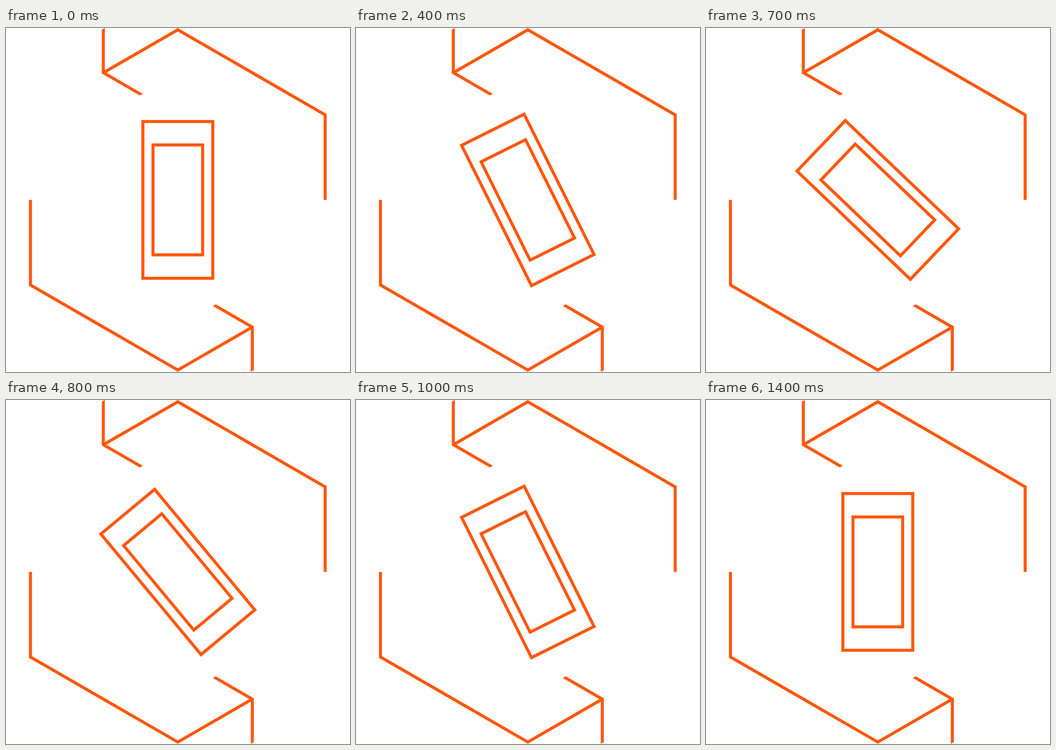
Animation of 748 by 748 pixels, one loop 1.5 s. Source, as an HTML page:

```html
<!DOCTYPE html>
<html lang="en">
<head>
<meta charset="utf-8">
<title>Rotate device</title>
<style>
  html, body { margin: 0; height: 100%; overflow: hidden; background: #fff; }
  svg { display: block; width: 100vw; height: 100vh; }
</style>
</head>
<body>
<svg viewBox="0 0 748 748" fill="none" stroke="#ff570d" stroke-width="6.6" stroke-miterlimit="10">
  <g id="arrow">
    <path d="M211.6 97.3 373.6 3.8 694 188.8V373.8"/>
    <path d="M208.3 3.7 214.9 0V95.3L297.5 143 291 146.8 208.3 99.1Z" fill="#ff570d" stroke="none"/>
  </g>
  <use href="#arrow" transform="rotate(180 373.6 373.8)"/>
  <g id="phone">
    <rect x="297.6" y="203.4" width="152" height="340.8"/>
    <rect x="319.6" y="254.3" width="108" height="239"/>
  </g>
</svg>
<script>
  const STEP_MS = 100, STEPS = 15, TURN = 6.62;
  const phone = document.getElementById('phone');

  // Tilts left for seven steps, then back upright.
  function draw(now) {
    const step = Math.floor(now / STEP_MS) % STEPS;
    const angle = -TURN * Math.min(step, STEPS - 1 - step);
    phone.setAttribute('transform', `rotate(${angle} 373.7 373.8)`);
  }

  const start = performance.now();
  function tick() {
    draw(performance.now() - start);
    requestAnimationFrame(tick);
  }
  tick();
</script>
</body>
</html>
```
